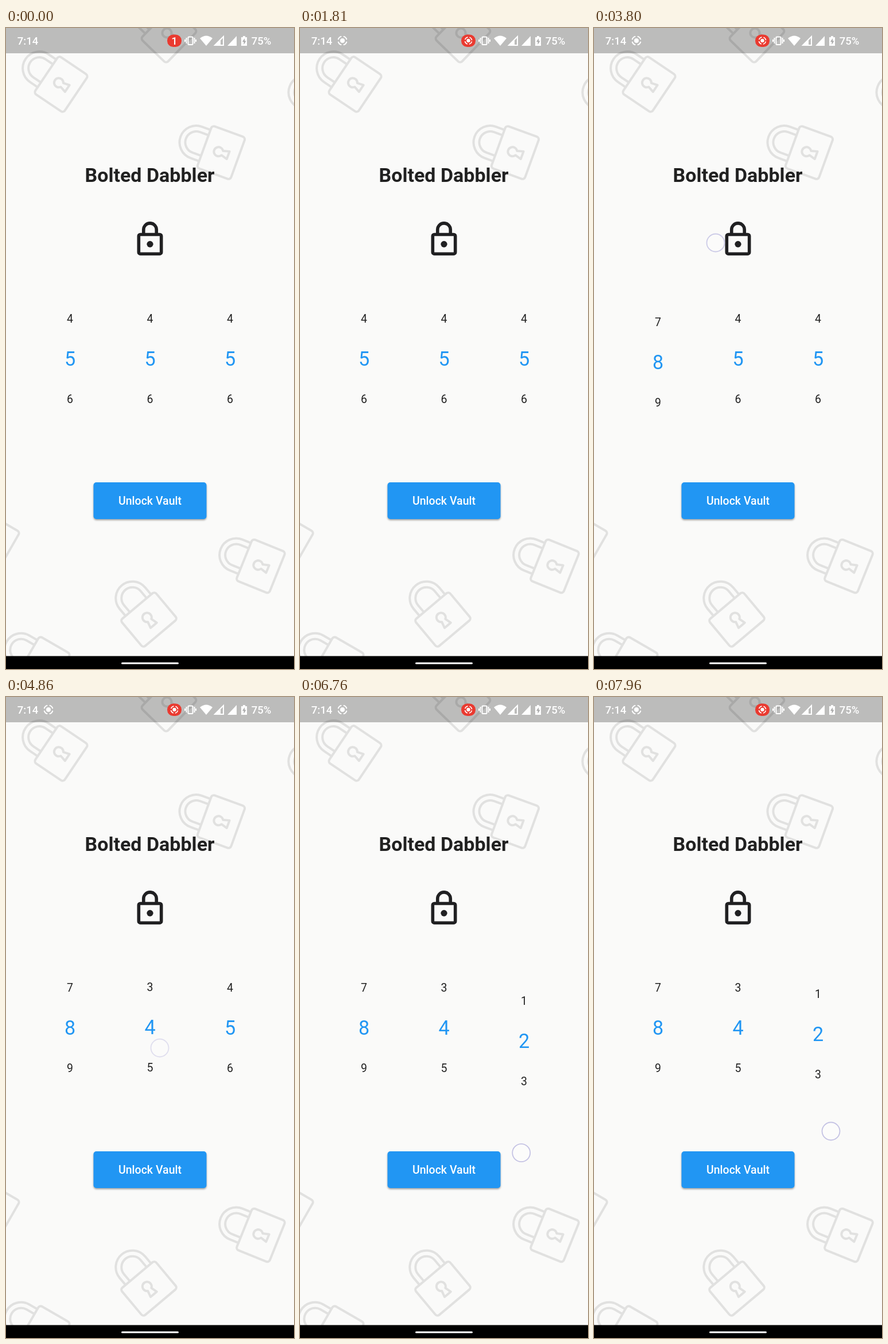
An HTML page that plays this animation: 502 by 1116 pixels, repeating every 8000 ms.

```html
<!DOCTYPE html>
<html lang="en">
<head>
<meta charset="utf-8">
<title>Vault dials</title>
<style>
  html, body { margin: 0; width: 100%; height: 100%; overflow: hidden; background: #fafaf9; }
  svg { display: block; width: 100%; height: 100%; }
  text { font-family: Roboto, sans-serif; text-anchor: middle; fill: #212121; }
  .title { font-size: 34px; font-weight: 700; }
  .label { font-size: 19.5px; font-weight: 500; fill: #fff; }
  .digit { font-size: 19.5px; }
  .digit.picked { font-size: 34.2px; fill: #2196f3; }
  .status text { font-size: 18.5px; font-weight: 500; fill: #fff; }
  .line { fill: none; stroke: #fff; stroke-width: 2; }
  .shadow { filter: drop-shadow(0 2px 1.5px rgba(0, 0, 0, .35)); }
</style>
</head>
<body>
<svg viewBox="0 0 502 1116">
  <defs>
    <clipPath id="window"><rect y="471" width="502" height="210"/></clipPath>
    <g id="padlock" fill="none" stroke="#e1e1e0" stroke-width="4" stroke-linejoin="round">
      <path d="M-27 -31V-47a29 29 0 0 1 58 0V-31M-17 -31V-47a19 19 0 0 1 38 0V-31"/>
      <rect x="-39" y="-31" width="78" height="62" rx="5"/>
      <path d="M-4 2A8 8 0 1 1 4 2L7 13H-7Z"/>
    </g>
    <g id="record">
      <circle r="4" fill="#fff"/>
      <circle class="line" r="7.6" pathLength="40" stroke-dasharray="7 3" stroke-dashoffset="-1.5"/>
    </g>
  </defs>

  <rect width="502" height="1116" fill="#fafaf9"/>
  <g id="wallpaper">
    <use href="#padlock" transform="translate(96 98) rotate(-56)"/>
    <use href="#padlock" transform="translate(375 217) rotate(-70)"/>
    <use href="#padlock" transform="translate(444 937) rotate(-68)"/>
    <use href="#padlock" transform="translate(249 1030) rotate(-40)"/>
    <use href="#padlock" transform="translate(284 12) rotate(-46)"/>
    <use href="#padlock" transform="translate(565 130) rotate(-70)"/>
    <use href="#padlock" transform="translate(-22 896) rotate(-60)"/>
    <use href="#padlock" transform="translate(66 1108) rotate(-60)"/>
  </g>

  <text class="title" x="250.5" y="268">Bolted Dabbler</text>
  <g transform="translate(217.3 334.2) scale(2.81)" fill="none" stroke="#202022" stroke-width="2">
    <rect x="5" y="9" width="14" height="12" rx="1"/>
    <path d="M8 9V6a4 4 0 0 1 8 0v3"/>
    <circle cx="12" cy="15" r="2" fill="#202022" stroke="none"/>
  </g>

  <g id="dials" clip-path="url(#window)"></g>

  <rect class="shadow" x="152.5" y="791" width="197" height="64" rx="5" fill="#2196f3"/>
  <text class="label" x="251" y="830">Unlock Vault</text>

  <g class="status">
    <rect width="502" height="44" opacity=".25"/>
    <text x="38" y="28.5">7:14</text>
    <use id="notice" href="#record" x="74" y="22"/>
    <rect x="281" y="11.5" width="25" height="21.5" rx="10.5" fill="#ea3a30"/>
    <text id="count" x="293.5" y="28.5">1</text>
    <use id="chip" href="#record" transform="translate(293.5 22) scale(.8)"/>
    <rect class="line" x="317.5" y="15.5" width="8" height="13.5" rx="1"/>
    <path class="line" d="M314.5 17v10M328.5 17v10M312 20v4M331 20v4" stroke-width="1.6"/>
    <path d="M349 31L338 18Q349 9 360 18Z" fill="#fff"/>
    <path class="line" d="M364 30L379 15V30Z" stroke-width="1.6"/>
    <path d="M363 31L374 20V31ZM386 31L402 14V31Z" fill="#fff"/>
    <path d="M410 16h3v-2h4v2h3v15h-10Z" fill="#fff"/>
    <path d="M416 18l-4 6h2.5v5l4-6.5h-2.5Z" fill="#aaa"/>
    <text x="445" y="28.5">75%</text>
  </g>

  <rect y="1093.5" width="502" height="23"/>
  <rect x="201" y="1104.5" width="100" height="3" rx="1.5" fill="#fff"/>
  <circle id="touch" r="15.5" fill="#fff" fill-opacity=".35" stroke="#c5c3e4" stroke-width="1.8"/>
</svg>

<script>
const LOOP = 8000, ROW = 70, MIDDLE = 576, FIRST = 5;
const SWIPE = 500;   // ms from touching down to the turning point
const LAG = 60;      // ms by which a dial trails the finger
const SETTLE = 250;  // ms for a released dial to reach a whole digit
const FADE = 140;

// Each finger swipes from one point to its turning point, then drifts until release.
const drags = [
  { start: 2155, release: 3780, from: { x: 140, y: 578 }, turn: { x: 195, y: 336 }, rest: { x: 212, y: 374 } },
  { start: 4230, release: 4790, from: { x: 256, y: 542 }, turn: { x: 268, y: 611 }, rest: { x: 268, y: 611 } },
  { start: 6311, release: 7960, from: { x: 376, y: 535 }, turn: { x: 386, y: 801 }, rest: { x: 413, y: 756 } }
];

const byId = id => document.getElementById(id);
const clamp = v => Math.max(0, Math.min(1, v));
const ease = v => (v = clamp(v)) * v * (3 - 2 * v);
const mix = (a, b, u) => a + (b - a) * u;

function makeText(x) {
  const node = document.createElementNS('http://www.w3.org/2000/svg', 'text');
  node.setAttribute('x', x);
  return byId('dials').appendChild(node);
}
drags.forEach((drag, i) => {
  drag.rows = Array.from({ length: 4 }, () => makeText(251 + (i - 1) * 139.5));
});

function finger({ start, release, from, turn, rest }, t) {
  const swipe = ease((t - start) / SWIPE);
  const drift = ease((t - start - SWIPE) / (release - start - SWIPE));
  const along = axis => mix(from[axis], turn[axis], swipe) + (rest[axis] - turn[axis]) * drift;
  return { x: along('x'), y: along('y') };
}

function dialValue(drag, t) {
  const pulled = FIRST - (finger(drag, t - LAG).y - drag.from.y) / ROW;
  return mix(pulled, Math.round(pulled), ease((t - LAG - drag.release) / SETTLE));
}

function drawDial(drag, t) {
  const value = dialValue(drag, t);
  drag.rows.forEach((row, i) => {
    const n = Math.floor(value) - 1 + i, picked = n === Math.round(value);
    row.textContent = (n + 10) % 10;
    row.setAttribute('class', picked ? 'digit picked' : 'digit');
    row.setAttribute('y', MIDDLE + (n - value) * ROW + (picked ? 12 : 7));
  });
}

function drawTouch(t) {
  const drag = drags.find(d => t >= d.start && t < d.release + FADE);
  const touch = byId('touch');
  touch.setAttribute('opacity', drag ? clamp((t - drag.start) / 60) * clamp(1 - (t - drag.release) / FADE) : 0);
  if (!drag) return;
  const { x, y } = finger(drag, t);
  touch.setAttribute('cx', x);
  touch.setAttribute('cy', y);
}

function draw() {
  const t = performance.now() % LOOP;
  const recording = t >= 270;
  byId('count').setAttribute('opacity', recording ? 0 : 1);
  byId('chip').setAttribute('opacity', recording ? 1 : 0);
  byId('notice').setAttribute('opacity', clamp((t - 270) / 250));
  drags.forEach(drag => drawDial(drag, t));
  drawTouch(t);
  requestAnimationFrame(draw);
}
draw();
</script>
</body>
</html>
```
